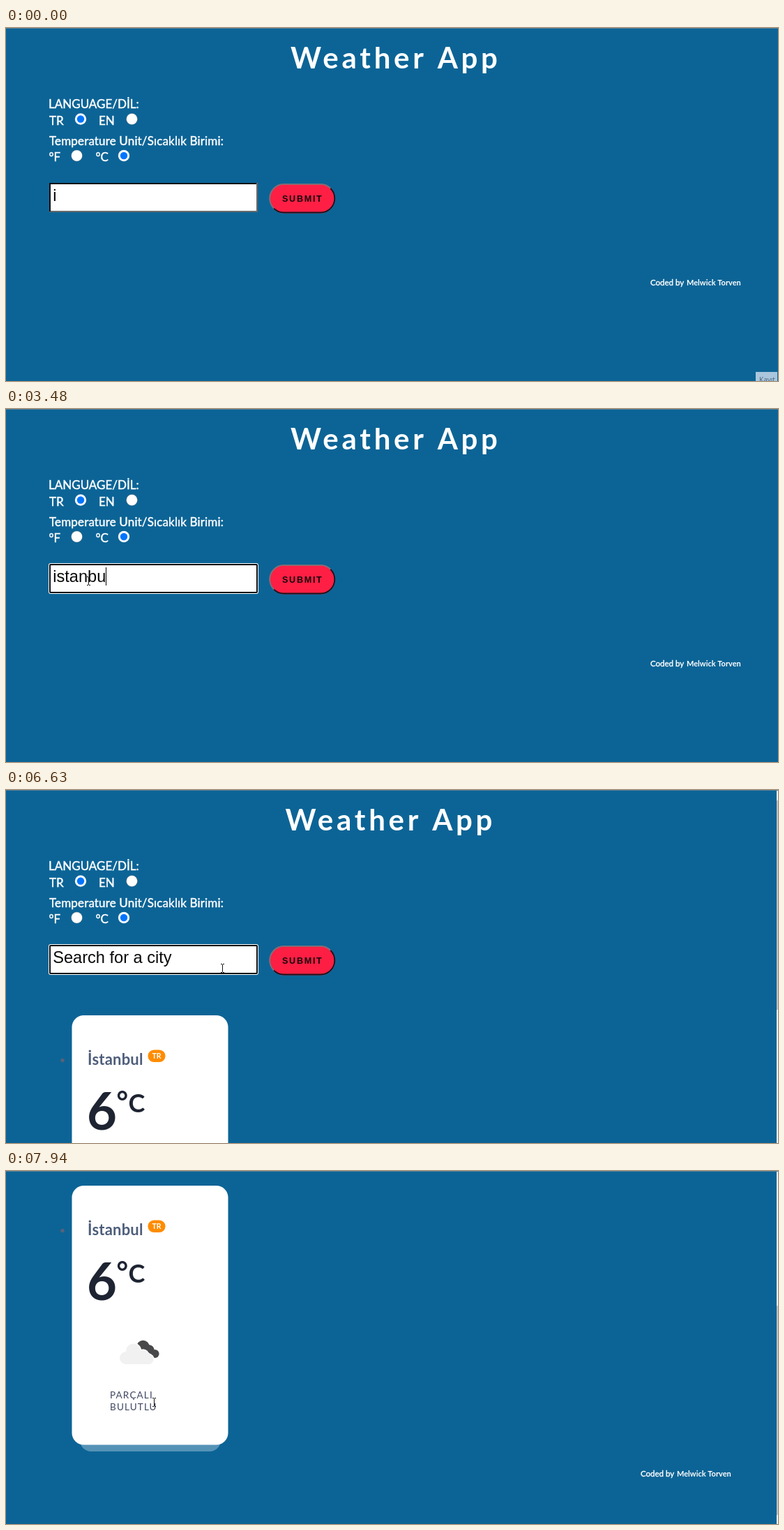
An HTML page with a canvas that plays this animation: 1107x506 px, repeating every 8 s.

```html
<!DOCTYPE html>
<html lang="tr">
<head>
<meta charset="utf-8">
<title>Weather App</title>
<style>
html, body { margin: 0; width: 100%; height: 100%; overflow: hidden; background: #0c6496; }
canvas { display: block; }
</style>
</head>
<body>
<canvas id="stage" width="1107" height="506"></canvas>
<script>
const ctx = document.getElementById('stage').getContext('2d');
const LOOP = 8000, STEP = 70;
const SOFT = 'Lato, "Open Sans", sans-serif';
const ARIAL = '"Liberation Sans", Arial, sans-serif';
const ENTER = 260, FOCUS = 930, BLUR = 5160, LOADED = 5750;
const HOVER = 4860, LEAVE = 6220;
const WORD = 'istanbul';
const KEYS = [2190, 2580, 2720, 3150, 3280, 3480, 3810];

const START = { x: 671, y: 427 };
const GLIDES = [
  { at: ENTER, span: 470, x: 118, y: 246 },
  { at: 4340, span: 530, x: 463, y: 244, sag: 9 },
  { at: 5950, span: 80, x: 454, y: 244 },
  { at: LEAVE, span: 750, x: 192, y: 259, sag: 3 },
  { at: 7040, span: 140, x: 271, y: 316 },
  { at: 7430, span: 310, x: 165, y: 333 },
  { at: 7810, span: 70, x: 212, y: 331 }
];

const ramp = (t, at, span) => Math.max(0, Math.min(1, (t - at) / span));
const smooth = k => k * k * (3 - 2 * k);
const mix = (a, b, k) => a + (b - a) * k;

function pointerAt(t) {
  let { x, y } = START;
  for (const g of GLIDES) {
    const k = smooth(ramp(t, g.at, g.span));
    x = mix(x, g.x, k);
    y = mix(y, g.y, k) + (g.sag || 0) * Math.sin(Math.PI * k);
  }
  return { x, y };
}

const scrollAt = t => 302 * smooth(ramp(t, 7143, 225));

function text(s, x, y, size, { weight = 400, color = '#fff', gap = 0, family = SOFT, fat = 0 } = {}) {
  ctx.font = `${weight} ${size}px ${family}`;
  ctx.letterSpacing = gap + 'px';
  ctx.fillStyle = ctx.strokeStyle = color;
  ctx.fillText(s, x, y);
  if (fat) {
    ctx.lineWidth = fat;
    ctx.strokeText(s, x, y);
  }
}

function rect(x, y, w, h, color) {
  ctx.fillStyle = color;
  ctx.fillRect(x, y, w, h);
}

function round(x, y, w, h, r, color) {
  ctx.beginPath();
  ctx.roundRect(x, y, w, h, r);
  ctx.fillStyle = color;
  ctx.fill();
}

const disc = (x, y, r, color) => round(x - r, y - r, 2 * r, 2 * r, r, color);

function radio(x, y, on) {
  disc(x, y, 8.2, on ? '#d5e6f5' : '#7d8791');
  disc(x, y, 7.7, '#fff');
  if (on) disc(x, y, 5.2, '#0075ff');
}

function header(shift) {
  const label = { fat: 0.45 };
  text('Weather App', 408 - shift, 58, 42, { weight: 700, gap: 4.75 });
  text('LANGUAGE/DİL:', 61, 115, 17, label);
  text('TR', 62, 139, 17, label);
  radio(107, 130.5, true);
  text('EN', 133, 139, 17, label);
  radio(180.5, 130.5, false);
  text('Temperature Unit/Sıcaklık Birimi:', 62, 167.5, 17, { fat: 0.45, gap: 0.15 });
  text('°F', 61.5, 191, 17, label);
  radio(101.5, 183, false);
  text('°C', 128.5, 191, 17, label);
  radio(169, 183, true);
}

function squiggle(x, end, y) {
  ctx.beginPath();
  for (let i = 0; x + i * 2 <= end; i++) ctx.lineTo(x + i * 2, y + (i % 2) * 1.8);
  ctx.strokeStyle = '#f03a3a';
  ctx.lineWidth = 1;
  ctx.stroke();
}

// The caret blinks afresh after each key press.
function caretOn(t) {
  const last = Math.max(...[FOCUS, ...KEYS, LOADED].filter(s => s <= t));
  return (t - last) % 1060 < 530;
}

function field(t) {
  const focused = (t >= FOCUS && t < BLUR) || t >= LOADED;
  if (focused) {
    round(61, 221, 301, 44, 3, '#fff');
    round(62, 222, 299, 42, 2, '#101010');
  } else {
    rect(62, 222, 299, 42, '#6a6a6a');
    rect(62, 222, 297, 2, '#101010');
    rect(62, 222, 2, 41, '#101010');
  }
  rect(64, 224, 295, 38, '#fff');
  const left = 67.2, count = 1 + KEYS.filter(s => s <= t).length;
  const typed = t < LOADED ? WORD.slice(0, count) : '';
  text(typed || 'Search for a city', left, 248, 23.6, { color: '#0a0a0a', family: ARIAL });
  const end = left + (typed ? ctx.measureText(typed).width : 0);
  if (typed && t >= 4340) squiggle(left, end, 249.5);
  if (focused && caretOn(t)) rect(Math.floor(end), 227, 1, 26, '#000');
}

function button(t) {
  const dark = ramp(t, HOVER, 430) - ramp(t, LEAVE, 430);
  const [r, g, b] = [mix(255, 192, dark), mix(31, 18, dark), mix(68, 44, dark)];
  round(377.5, 223, 94.5, 42.5, 21.2, `rgb(${r},${g},${b})`);
  const x1 = 398.5, x2 = 451, y = 244.2, rad = 20.3, q = Math.PI / 4;
  ctx.lineWidth = 1.8;
  ctx.beginPath();
  ctx.arc(x1, y, rad, 3 * q, 6 * q);
  ctx.arc(x2, y, rad, -2 * q, -q);
  ctx.strokeStyle = '#77747c';
  ctx.stroke();
  ctx.beginPath();
  ctx.arc(x2, y, rad, -q, 2 * q);
  ctx.arc(x1, y, rad, 2 * q, 3 * q);
  ctx.strokeStyle = '#16141c';
  ctx.stroke();
  text('SUBMIT', 396, 249, 12.6, { weight: 700, color: '#12060c', gap: 1.7, family: ARIAL });
}

function cloud(x, y) {
  // dark puffs shrink along a slope behind the light cloud
  for (let i = 0; i < 3; i++) disc(x + 34 + i * 8.5, y - 16 + i * 5, 9.3 - i * 1.6, '#48484a');
  for (const [grow, color] of [[1.3, '#fff'], [0, '#f1f1f1']]) {
    disc(x + 9.5, y, 9 + grow, color);
    disc(x + 20, y - 10, 10.5 + grow, color);
    disc(x + 34, y - 4, 7.5 + grow, color);
    disc(x + 42, y + 2, 7 + grow, color);
    round(x + 3, y - 8, 44, 17 + grow, 8, color);
  }
}

function card() {
  disc(81, 387.5, 2.7, '#57617c');
  round(106, 660, 202, 44, 16, 'rgba(255,255,255,.3)');
  round(94.5, 323, 224, 371.5, 17, '#fff');
  text('İstanbul', 117, 394, 22, { weight: 700, color: '#4d5d7a', gap: 0.2 });
  round(203.5, 372.5, 25, 17.5, 8.7, '#ff8c00');
  text('TR', 209.5, 385.2, 10.5, { weight: 700 });
  const ink = { weight: 700, color: '#1e2432' };
  text('6', 116, 487, 74, ink);
  text('°', 158.5, 461, 40, ink);
  text('C', 175.5, 461.5, 36, ink);
  cloud(162.5, 570);
  const label = { color: '#3f4861', gap: 1.15 };
  text('PARÇALI', 149, 628, 13.5, label);
  text('BULUTLU', 149, 645, 13.5, label);
}

function footer(loaded) {
  const x = loaded ? 910 : 924, y = loaded ? 740 : 369;
  text('Coded by', x, y, 11.5, { fat: 0.4 });
  text('Melwick Torven', x + 52, y, 11, { weight: 700 });
}

function arrow(x, y) {
  ctx.beginPath();
  for (const [dx, dy] of [[0, 0], [0, 14], [3, 11], [5.5, 16], [7.5, 15], [5.5, 10], [10, 10]]) ctx.lineTo(x + dx, y + dy);
  ctx.closePath();
  ctx.fillStyle = '#fff';
  ctx.fill();
  ctx.strokeStyle = '#111';
  ctx.lineWidth = 1;
  ctx.stroke();
}

function beam(x, y) {
  x = Math.round(x);
  y = Math.round(y);
  rect(x, y - 5, 1, 11, '#111');
  for (const dy of [-6, 6]) {
    rect(x - 2, y + dy, 2, 1, '#111');
    rect(x + 1, y + dy, 2, 1, '#111');
  }
}

function hand(x, y) {
  for (const [grow, color] of [[1, '#111'], [0, '#fff']]) {
    const part = (dx, dy, w, h, r) =>
      round(x + dx - grow, y + dy - grow, w + 2 * grow, h + 2 * grow, r + grow, color);
    part(-1.5, 0, 3, 14, 1.5);
    part(-1.5, 7, 8, 11, 3);
    part(-5.5, 10, 6, 4, 2);
  }
}

function pointer(t, scroll) {
  if (t < ENTER - STEP) return;
  const { x, y } = pointerAt(t), py = y + scroll;
  const over = (l, top, r, bottom) => x >= l && x <= r && py >= top && py <= bottom;
  if (over(378, 223, 472, 265)) hand(x, y);
  else if (over(62, 222, 361, 264) || over(148, 613, 217, 650)) beam(x, y);
  else arrow(x, y);
}

function draw(t) {
  const tick = Math.floor((t - 40) / STEP) * STEP + 40;
  const loaded = t >= LOADED, scroll = scrollAt(tick);
  rect(0, 0, 1107, 506, '#0c6496');
  ctx.save();
  ctx.translate(0, -Math.round(scroll));
  header(loaded ? 7.5 : 0);
  field(t);
  button(t);
  if (loaded) card();
  footer(loaded);
  ctx.restore();
  if (loaded) {
    rect(1105, 1, 2, 505, '#f1f1f1');
    rect(1105, 15 + scroll * 0.59, 2, 300, '#c1c1c1');
  }
  rect(0, 0, 1107, 1, '#587f95');
  if (t < 70) {
    rect(1075, 493, 31, 13, '#a9c6dc');
    text('Kayıt', 1080, 508, 10, { color: '#47617a', family: '"Open Sans", sans-serif' });
  }
  if (t >= ENTER) pointer(tick, scroll);
}

const begin = performance.now();
function frame() {
  draw((performance.now() - begin) % LOOP);
  requestAnimationFrame(frame);
}
frame();
</script>
</body>
</html>
```
